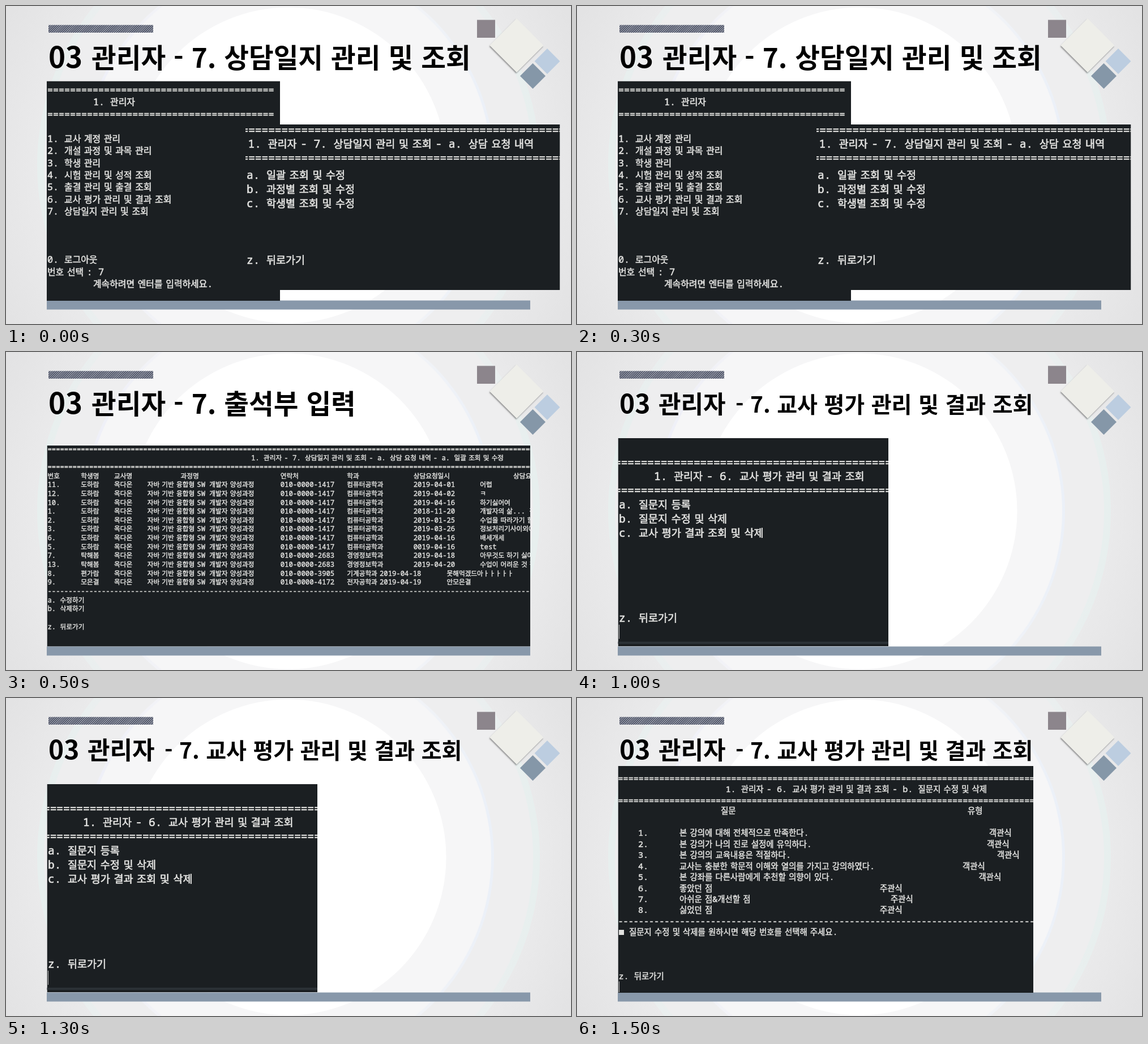
These frames come from a looping animation (998 px wide and 561 px high, 2000 ms). An HTML page:

```html
<!DOCTYPE html>
<html lang="ko">
<head>
<meta charset="utf-8">
<style>
  html, body { margin: 0; width: 100%; height: 100%; overflow: hidden; }
  svg { display: block; }
  text { white-space: pre; }
  .term { font-family: "Noto Sans Mono", "DejaVu Sans Mono", monospace; fill: #e2e2e0; }
  .term text { stroke: #e2e2e0; stroke-width: .035em; }
  .ko { font-family: "Noto Sans CJK KR", "Noto Sans CJK", sans-serif; font-size: .952em; word-spacing: .08em; }
  .title { font-family: "Noto Sans CJK KR", "Noto Sans CJK", sans-serif; font-weight: 900; word-spacing: .015em; }
</style>
</head>
<body>
<svg width="998" height="561" viewBox="0 0 998 561">
  <defs>
    <radialGradient id="back" gradientUnits="userSpaceOnUse" cx="499" cy="281" r="560">
      <stop offset=".6" stop-color="#f0f0f1"/><stop offset="1" stop-color="#e3e3e4"/>
    </radialGradient>
    <linearGradient id="mint"><stop stop-color="#e7efee"/><stop offset=".25" stop-color="#eeeef0"/><stop offset=".75" stop-color="#eeeef0"/><stop offset="1" stop-color="#e7efee"/></linearGradient>
    <linearGradient id="lilac"><stop stop-color="#eeeff8"/><stop offset=".3" stop-color="#f5f5f6"/><stop offset=".7" stop-color="#f5f5f6"/><stop offset="1" stop-color="#ebf0f8"/></linearGradient>
    <pattern id="hatch" width="2.7" height="2.7" patternUnits="userSpaceOnUse" patternTransform="rotate(45)">
      <rect width="2.7" height="2.7" fill="#c5c7d0"/><rect width="1.7" height="2.7" fill="#40465a"/>
    </pattern>
    <filter id="shadow" x="-20%" y="-20%" width="140%" height="140%">
      <feDropShadow dx="-1" dy="2" stdDeviation="1.2" flood-color="#555" flood-opacity=".6"/>
    </filter>
  </defs>
  <rect width="998" height="561" fill="url(#back)"/>
  <circle cx="499" cy="281" r="444" fill="url(#mint)"/>
  <circle cx="499" cy="281" r="432" fill="#eeeeef"/>
  <circle cx="499" cy="281" r="363" fill="url(#lilac)"/>
  <circle cx="499" cy="281" r="358" fill="#f6f6f7"/>
  <circle cx="499" cy="281" r="278.5" fill="#fff"/>
  <rect x="75" y="33.5" width="185" height="13.5" fill="url(#hatch)"/>
  <rect x="832" y="24.5" width="32" height="31.5" fill="#8c858c"/>
  <path d="M902 22l47.500 47.500-47.500 47.500-47.500-47.500z" fill="#eeeee9" filter="url(#shadow)"/>
  <path d="M956 75l22.500 22.500-22.500 22.500-22.500-22.500z" fill="#bccde0"/>
  <path d="M930.500 101l22.500 22.500-22.500 22.500-22.500-22.500z" fill="#8597a8"/>
  <rect x="72" y="519.500" width="854" height="16" fill="#8898aa"/>
  <g id="stage"></g>
</svg>
<script>
const markKorean = s => s.replace(/&/g, '&amp;')
  .replace(/[ㄱ-ㅣ가-힣][ㄱ-ㅣ가-힣 ]*/g, '<tspan class="ko">$&</tspan>');
const line = ([x, y, s]) => `<text x="${x}" y="${y}" dy=".35em">${markKorean(s)}</text>`;
const rect = (x, y, w, h, fill) => `<rect x="${x}" y="${y}" width="${w}" height="${h}" fill="${fill}"/>`;
const title = (x, y, size, s) => `<text class="title" x="${x}" y="${y}" font-size="${size}">${s}</text>`;

// Dark terminal window; rows are [x, middle y, text] and clip at its edges.
const terminal = (x, y, w, h, size, rows, extra = '') =>
  `<svg class="term" x="${x}" y="${y}" width="${w}" height="${h}" viewBox="${x} ${y} ${w} ${h}" font-size="${size}">
   ${rect(x, y, w, h, '#1b1f22')}${rows.map(line).join('')}${extra}</svg>`;
const list = (x, y, step, items) => items.map((s, i) => [x, y + i * step, s]);
const rule = (x, y, n, ch = '=') => [x, y, ch.repeat(n)];

const adminTitle = s => title(75, 109, 51, '03') + title(151, 109, 47.5, '관리자 - 7. ' + s);
const reviewTitle = title(75, 108, 46, '03') + title(144, 108, 43, '관리자') +
  title(280, 107, 39, '- 7. 교사 평가 관리 및 결과 조회');

function mainMenu() {
  const left = [rule(73, 148, 40), [154, 169.5, '1. 관리자'], rule(73, 191, 40),
    ...list(73, 234, 21.35, ['1. 교사 계정 관리', '2. 개설 과정 및 과목 관리', '3. 학생 관리',
      '4. 시험 관리 및 성적 조회', '5. 출결 관리 및 출결 조회', '6. 교사 평가 관리 및 결과 조회',
      '7. 상담일지 관리 및 조회', '', '', '', '0. 로그아웃', '번호 선택 : 7']),
    [154, 490, '계속하려면 엔터를 입력하세요.']];
  const right = [rule(416.5, 219, 50), [427.5, 243.5, '1. 관리자 - 7. 상담일지 관리 및 조회 - a. 상담 요청 내역'],
    rule(416.5, 268.5, 50),
    ...list(425, 298.5, 25, ['a. 일괄 조회 및 수정', 'b. 과정별 조회 및 수정', 'c. 학생별 조회 및 수정',
      '', '', '', 'z. 뒤로가기'])];
  return adminTitle('상담일지 관리 및 조회') +
    terminal(72, 132.5, 412, 387.5, 16.7, left) + terminal(423, 209, 555.5, 292, 19.45, right);
}

function consultations() {
  const step = 15.63, top = 171.5;
  const row = (r, cells) => cells.map(([col, s]) => [73.5 + 58.75 * col, top + r * step, s]);
  const students = [['도하람', '010-0000-1417', '컴퓨터공학과'], ['탁해봄', '010-0000-2683', '경영정보학과'],
    ['편가람', '010-0000-3905', '기계공학과'], ['모은결', '010-0000-4172', '전자공학과']];
  const records = [[11, 0, '2019-04-01', '어렵'], [12, 0, '2019-04-02', 'ㅋ'], [10, 0, '2019-04-16', '하기싫어여'],
    [1, 0, '2018-11-20', '개발자의 삶... 정말'], [2, 0, '2019-01-25', '수업을 따라가기 힘들어요'],
    [3, 0, '2019-03-26', '정보처리기사이외에'], [6, 0, '2019-04-16', '배세개세'], [5, 0, '0019-04-16', 'test'],
    [7, 1, '2019-04-18', '아무것도 하기 싫어요'], [13, 1, '2019-04-20', '수업이 어려운 것 같아요'],
    [8, 2, '2019-04-18', '못해먹겠드아ㅏㅏㅏㅏㅏ'], [9, 3, '2019-04-19', '안모은결']];
  const body = records.flatMap(([no, who, date, note], i) => {
    const [name, phone, dept] = students[who];
    const end = dept.length < 6 ? [[9, dept + ' ' + date], [12, note]] : [[9, dept], [11, date], [13, note]];
    return row(i + 4, [[0, no + '.'], [1, name], [2, '옥다온'], [3, '자바 기반 융합형 SW 개발자 양성과정'], [7, phone], ...end]);
  });
  const rows = [rule(73.5, top, 118), [433, 187, '1. 관리자 - 7. 상담일지 관리 및 조회 - a. 상담 요청 내역 - a. 일괄 조회 및 수정'],
    rule(73.5, 203, 118),
    ...row(3, [[0, '번호'], [1, '학생명'], [2, '교사명'], [4, '과정명'], [7, '연락처'], [9, '학과'], [11, '상담요청일시'], [14, '상담요청']]),
    ...body, rule(73.5, 421.5, 118, '-'),
    ...list(73.5, 437.5, step, ['a. 수정하기', 'b. 삭제하기', '', 'z. 뒤로가기'])];
  return adminTitle('출석부 입력') + terminal(72.5, 165, 853.5, 354.5, 12.24, rows);
}

function reviewMenu() {
  const rows = [rule(66, 195, 43), [136, 219, '1. 관리자 - 6. 교사 평가 관리 및 결과 조회'], rule(66, 244, 43),
    ...list(74, 269, 25, ['a. 질문지 등록', 'b. 질문지 수정 및 삭제', 'c. 교사 평가 결과 조회 및 삭제',
      '', '', '', '', '', 'z. 뒤로가기'])];
  return reviewTitle + terminal(72.5, 152, 477.5, 367, 19.45, rows,
    rect(74, 481, 1, 25, '#c8c8c8') + rect(72, 511, 478, 4, '#2b3136'));
}

function questions() {
  const items = [['본 강의에 대해 전체적으로 만족한다.', 728], ['본 강의가 나의 진로 설정에 유익하다.', 724],
    ['본 강의의 교육내용은 적절하다.', 742], ['교사는 충분한 학문적 이해와 열의를 가지고 강의하였다.', 681],
    ['본 강좌를 다른사람에게 추천할 의향이 있다.', 709.5], ['좋았던 점', 535], ['아쉬운 점&개선할 점', 554], ['싫었던 점', 535]];
  const body = items.flatMap(([s, x], i) => {
    const y = 238 + i * 19.45;
    return [[108, y, i + 1 + '.'], [181, y, s], [x, y, i < 5 ? '객관식' : '주관식']];
  });
  const rows = [rule(72.5, 142, 82), [262.5, 160.5, '1. 관리자 - 6. 교사 평가 관리 및 결과 조회 - b. 질문지 수정 및 삭제'],
    rule(72.5, 181, 82), [254, 199, '질문'], [690, 199, '유형'], ...body, rule(72.5, 394, 82, '-'),
    [92, 413, '질문지 수정 및 삭제를 원하시면 해당 번호를 선택해 주세요.'], [73.5, 491, 'z. 뒤로가기']];
  return reviewTitle + terminal(72.5, 120, 733.5, 400, 15.15, rows,
    rect(74, 409, 9, 9, '#e2e2e0') + rect(74, 500, 1, 19, '#c8c8c8'));
}

const stage = document.getElementById('stage');
stage.innerHTML = [mainMenu, consultations, reviewMenu, questions].map(draw => `<g>${draw()}</g>`).join('');
const scenes = [...stage.children];

function tick() {
  const current = Math.floor(performance.now() % 2000 / 500);
  scenes.forEach((g, i) => g.setAttribute('display', i === current ? 'inline' : 'none'));
  requestAnimationFrame(tick);
}
tick();
</script>
</body>
</html>
```
